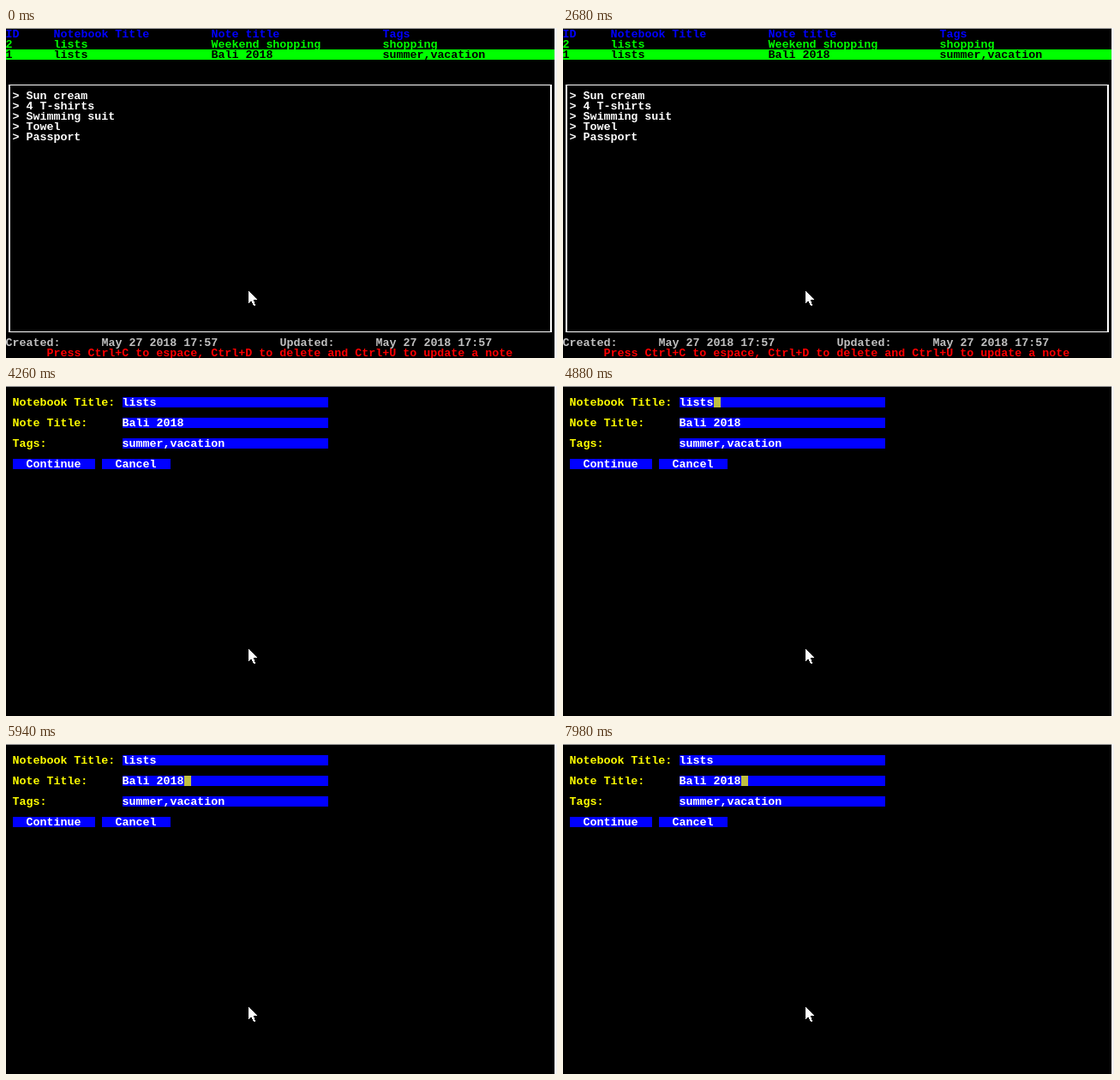
Recreate the animation shown at these times as an HTML page. Size 643 by 385 pixels, loop 8 s.

```html
<!DOCTYPE html>
<html lang="en">
<head>
<meta charset="utf-8">
<title>Terminal notes</title>
<style>
html, body { margin: 0; width: 100%; height: 100%; overflow: hidden; background: #000; }
svg { display: block; }
text { font: bold 13.333px "Liberation Mono", "DejaVu Sans Mono", monospace; white-space: pre; }
</style>
</head>
<body>
<svg width="643" height="385" viewBox="0 0 643 385" shape-rendering="crispEdges">
  <g id="screen"></g>
  <path d="M0 0H640V1H0Z" fill="#a0a0a0"/>
  <path d="M640 0H641V385H640Z" fill="#e3e3e3"/>
  <path d="M641 0H642V385H641Z" fill="#fff"/>
  <path d="M642 0H643V385H642Z" fill="#f0f0f0"/>
  <path d="M282.6 305.6V321.6L286.1 318.1L288.6 323.6H291.1L288.6 317.1H293.1Z" fill="#fff"/>
</svg>
<script>
const LOOP = 8000;
const CELL_W = 8, CELL_H = 12, TOP = 1;
const BLUE = '#00f', GREEN = '#0f0', WHITE = '#fff', GREY = '#c0c0c0', RED = '#f00', YELLOW = '#ff0';

const notes = [
  { cells: ['2', 'lists', 'Weekend shopping', 'shopping'], date: 'May 27 2018 19:20',
    lines: ['Eggs', 'Milk', 'Bread', '1/4 pound of beef', 'chocolate cake'] },
  { cells: ['1', 'lists', 'Bali 2018', 'summer,vacation'], date: 'May 27 2018 17:57',
    lines: ['Sun cream', '4 T-shirts', 'Swimming suit', 'Towel', 'Passport'] }
];

// Positions are given in character cells; glyphs sit slightly left in their cells.
const print = (col, row, str, color) =>
  `<text x="${col * CELL_W - 0.6}" y="${TOP + row * CELL_H + 10}" fill="${color}">${str.replace(/>/g, '&gt;')}</text>`;
const fill = (col, row, cols, color) =>
  `<rect x="${col * CELL_W}" y="${TOP + row * CELL_H}" width="${cols * CELL_W}" height="${CELL_H}" fill="${color}"/>`;
const tableRow = (cells, row, color) =>
  cells.map((str, i) => print([0, 7, 30, 55][i], row, str, color)).join('');

function listScreen(selected) {
  const { lines, date } = notes[selected];
  return tableRow(['ID', 'Notebook Title', 'Note title', 'Tags'], 0, BLUE)
    + fill(0, selected + 1, 80, GREEN)
    + notes.map((n, i) => tableRow(n.cells, i + 1, i === selected ? '#000' : GREEN)).join('')
    + '<path d="M3 66H637V355H3ZM5 67V354H635V67Z" fill="#fff" fill-rule="evenodd"/>'
    + lines.map((str, i) => print(1, 6 + i, '> ' + str, WHITE)).join('')
    + print(0, 30, 'Created:', GREY) + print(14, 30, date, GREY)
    + print(40, 30, 'Updated:', GREY) + print(54, 30, date, GREY)
    + print(6, 31, 'Press Ctrl+C to espace, Ctrl+D to delete and Ctrl+U to update a note', RED);
}

function formScreen(caretField) {
  const labels = ['Notebook Title:', 'Note Title:', 'Tags:'];
  const values = notes[1].cells.slice(1);
  const fields = labels.map((label, i) => {
    const row = 1 + 2 * i;
    const caret = i === caretField ? fill(17 + values[i].length, row, 1, '#bfbf40') : '';
    return print(1, row, label, YELLOW) + fill(17, row, 30, BLUE) + print(17, row, values[i], WHITE) + caret;
  });
  return fields.join('')
    + fill(1, 7, 12, BLUE) + print(3, 7, 'Continue', WHITE)
    + fill(14, 7, 10, BLUE) + print(16, 7, 'Cancel', WHITE);
}

const selectBali = listScreen(1), selectShopping = listScreen(0);
const noCaret = formScreen(-1), titleCaret = formScreen(0), noteCaret = formScreen(1);
const timeline = [
  [0, selectBali], [500, selectShopping], [2680, selectBali],
  [3480, noCaret], [3750, titleCaret], [4260, noCaret], [4880, titleCaret], [5410, noCaret],
  [5940, noteCaret], [6450, noCaret], [6950, noteCaret], [7470, noCaret], [7980, noteCaret]
];

const screenEl = document.getElementById('screen');
let shown;
const start = performance.now();
function draw(now) {
  const t = Math.max(0, now - start) % LOOP;
  const markup = timeline.findLast(([at]) => at <= t)[1];
  if (markup !== shown) screenEl.innerHTML = shown = markup;
  requestAnimationFrame(draw);
}
draw(start);
</script>
</body>
</html>
```
